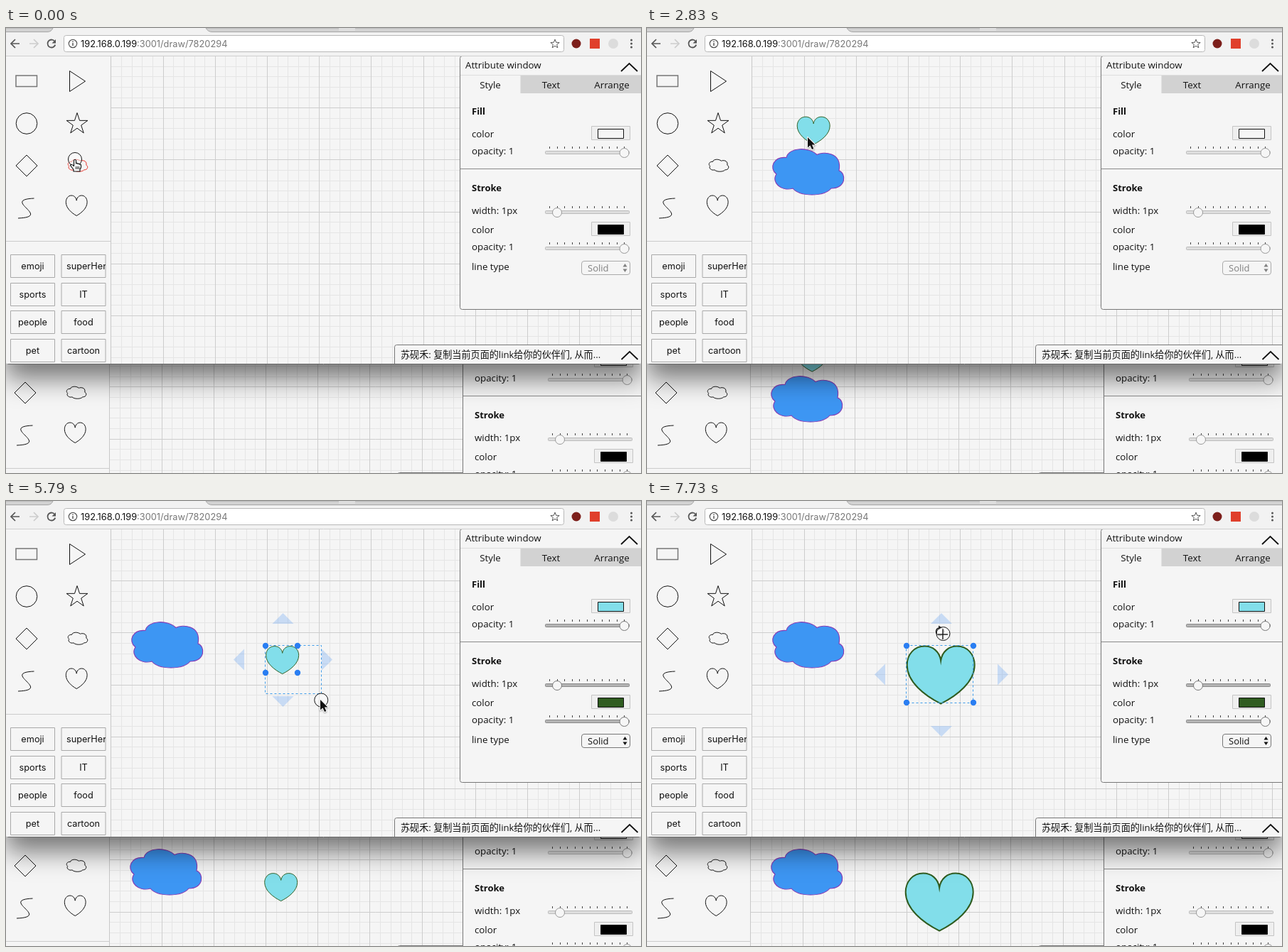
Recreate the animation shown at these times as an HTML page with a canvas. Size 893 by 627 pixels, loop 8 s.

```html
<!DOCTYPE html>
<html lang="en">
<head>
<meta charset="utf-8">
<title>Shared drawing board</title>
<style>
html, body { margin: 0; height: 100%; overflow: hidden; background: #f5f5f5; }
canvas { display: block; }
</style>
</head>
<body>
<canvas id="stage" width="893" height="627"></canvas>
<script>
const c = document.getElementById('stage').getContext('2d');
const LOOP = 8000, BG = '#f5f5f5';
const UI = 'Inter, sans-serif';
const PANEL = '"Open Sans", "Noto Sans CJK SC", "Noto Sans CJK", sans-serif';

const CLOUD = new Path2D('M5 35C-6 26 1 10 19 11.5C22 -3 51 -4 62 7.5C70 3 98 3 93 30' +
  'C103 33 104 55 82 55C72 67 38 67 28 55C12 60 -3 46 5 35Z');
const HEART = new Path2D('M50 25C48 9 38 0 26 0C11 0 0 14 0 33C0 62 26 86 50 100' +
  'C74 86 100 62 100 33C100 14 89 0 74 0C62 0 52 9 50 25Z');
const ARROW = new Path2D('M0 0V14.5L3.4 11.4L6 17L8.4 16L6 10.5H10.5Z');
const HAND = new Path2D('M-1.5 1.5Q0 -1 1.5 1.5V6Q3 4.5 4 6.5Q5.5 5.5 6.5 7.2Q8.5 6.5 8.5 9' +
  'V11Q8 13 7 14V17H-2V14.5L-6.5 8.5Q-5 6 -1.5 9.5Z');
const RESIZE = new Path2D('M-4 -4H2L0 -2L4 2L5 1V5H1L2 4L-2 0L-4 2Z');

// Cursor legs: start, frames, frame length, target, ease power, cursor on the way, cursor at the end
const LEGS = [
  [0, 1, 150, [97, 185], 1, 'hand', 'hand'],
  [1030, 3, 150, [98, 236], 1, 'arrow', 'arrow'],
  [1780, 1, 150, [98, 248], 1, 'hand', 'hand'],
  [2380, 6, 150, [237, 146], 2.3, 'arrow', 'arrow'],
  [3710, 5, 150, [392, 223], 1.4, 'arrow', 'arrow'],
  [4600, 3, 150, [407, 241], 1, 'arrow', 'resize'],
  [5640, 3, 150, [451, 291], 1.42, 'arrow', 'arrow'],
  [6090, 1, 150, [451, 290], 1, 'resize', 'resize'],
  [6390, 8, 148.5, [415, 187], 2, 'arrow', 'cross'],
];
const PRESSES = [[0, 140], [440, 590], [2230, 2380], [3420, 4310], [5350, 6090], [7730, LOOP]];

function pointer(t) {
  let from = LEGS[0][3], pose;
  for (const [start, n, step, to, power, way, end] of LEGS) {
    if (t < start) break;
    const k = Math.min(n, Math.floor((t - start) / step) + 1);
    const f = 1 - (1 - k / n) ** power;
    pose = { x: from[0] + (to[0] - from[0]) * f, y: from[1] + (to[1] - from[1]) * f,
             kind: k < n ? way : end, k };
    from = to;
  }
  pose.pressed = PRESSES.some(([a, b]) => t >= a && t < b);
  return pose;
}

function heartBox(t) {
  if (t < 4310) return [210.5, 124.5, 45, 38];
  return t < 6090 ? [365, 204, 45, 38] : [365, 204, 94, 80];
}

function ghostBox(t, p) {
  if (!p.pressed || t < 3420) return null;
  const [x, y, w, h] = heartBox(t);
  if (t < 4310) return [x + p.x - 237, y + p.y - 146, w, h];
  if (t < 5640 || t > 7000) return [x, y, w, h];
  const f = (p.k / 3) ** 0.92;
  return [x, y, w + 49 * f, h + 42 * f];
}

function rect(x, y, w, h, fill, stroke, r = 0, lw = 1) {
  c.beginPath();
  c.roundRect(x, y, w, h, r);
  paint(fill, stroke, lw);
}
function disc(x, y, r, fill, stroke, lw = 1) {
  c.beginPath();
  c.arc(x, y, r, 0, 7);
  paint(fill, stroke, lw);
}
function poly(points, fill, stroke, lw = 1, closed = true) {
  c.beginPath();
  points.forEach(([x, y]) => c.lineTo(x, y));
  if (closed) c.closePath();
  paint(fill, stroke, lw);
}
function paint(fill, stroke, lw) {
  if (fill) { c.fillStyle = fill; c.fill(); }
  if (stroke) { c.strokeStyle = stroke; c.lineWidth = lw; c.stroke(); }
}
const line = (x1, y1, x2, y2, color, lw = 1) => poly([[x1, y1], [x2, y2]], null, color, lw, false);

function text(s, x, y, font, color = '#111', align = 'left') {
  c.font = font;
  c.fillStyle = color;
  c.textAlign = align;
  c.fillText(s, x, y);
}
function shape(path, x, y, sx, sy, fill, stroke, lw) {
  const p = new Path2D();
  p.addPath(path, new DOMMatrix([sx, 0, 0, sy, x, y]));
  if (fill) { c.fillStyle = fill; c.fill(p); }
  c.strokeStyle = stroke;
  c.lineWidth = lw;
  c.stroke(p);
}
function star(x, y, outer, inner, stroke) {
  poly([...Array(10).keys()].map(i => {
    const r = i % 2 ? inner : outer, a = i * Math.PI / 5;
    return [x + r * Math.sin(a), y - r * Math.cos(a)];
  }), null, stroke);
}
const chevron = (x, y) => poly([[x - 11.5, y + 11], [x, y], [x + 11.5, y + 11]], null, '#111', 1.8, false);

function grid() {
  const cell = 14.64;
  for (const major of [false, true]) {
    const color = major ? '#cdcdcd' : '#e5e5e5';
    for (let i = 1; i < 52; i++) {
      if ((i % 5 === 0) !== major) continue;
      const x = Math.floor(147.9 + i * cell) + .5, y = Math.floor(39.5 + i * cell) + .5;
      line(x, 39, x, 480, color);
      if (y < 480) line(147, y, 900, y, color);
    }
  }
}

function sidebar(hover) {
  rect(0, 39, 147, 441, BG);
  line(147.5, 39, 147.5, 480, '#c8c8c8');
  line(0, 300.5, 147, 300.5, '#ccc');
  rect(14, 67, 29.5, 15.5, null, '#777', 0, 1.5);
  poly([[89.5, 60.5], [111.5, 75], [89.5, 89.5]], null, '#111');
  disc(29, 134.5, 14.8, null, '#111');
  star(100, 135.2, 15.7, 6, '#111');
  poly([[29, 179], [44, 194], [29, 209], [14, 194]], null, '#111');
  shape(CLOUD, 87.3, 185.3, .275, .265, null, hover === 'cloud' ? '#e8342c' : '#111', 1);
  c.beginPath();
  c.moveTo(39.5, 240);
  c.bezierCurveTo(-8, 242, 66, 266, 17, 268);
  paint(null, '#111', 1);
  shape(HEART, 84.3, 236, .298, .285, null, hover === 'heart' ? '#e8342c' : '#111', 1);
  const rows = [['emoji', 'superHero'], ['sports', 'IT'], ['people', 'food'], ['pet', 'cartoon']];
  rows.forEach((row, i) => row.forEach((label, j) => {
    const x = 6.5 + 71.5 * j, y = Math.floor(319.5 + 39.6 * i) + .5;
    c.save();
    rect(x, y, 62, 32, null, '#a9a9a9');
    c.clip();
    const wide = label.length > 8;
    text(label, wide ? 85 : x + 31, y + 20.5, '12.7px ' + UI, '#111', wide ? 'left' : 'center');
    c.restore();
  }));
}

function slider(y, knob, on) {
  for (let i = 0; i < 11; i++) line(764.5 + Math.round(i * 10.5), y - 8, 764.5 + Math.round(i * 10.5), y - 5, '#444');
  rect(758.5, y - 1.5, 118, 4, on ? '#b4b4b4' : '#dedede', on ? '#8b8b8b' : '#bbb', 1);
  disc(knob, y + 1, 6.5, '#f6f6f6', on ? '#777' : '#999');
}
function swatch(y, color) {
  rect(823.5, y + .5, 54, 19, '#efefef', '#c4c4c4');
  rect(832.5, y + 4.5, 36, 13, color, '#111');
}

function panel(on) {
  const font = '13.3px ' + PANEL, bold = 'bold 13px ' + PANEL;
  rect(638.5, 39.5, 262, 357, BG, '#777', 3);
  text('Attribute window', 646, 56.5, font);
  chevron(876.5, 50);
  line(639, 66.5, 893, 66.5, '#ddd');
  rect(723.5, 67, 176, 25, '#d2d2d2');
  ['Style', 'Text', 'Arrange'].forEach((s, i) => text(s, 681 + 85.5 * i, 85, font, '#111', 'center'));
  text('Fill', 655, 122, bold);
  text('color', 655, 154, font);
  swatch(138, on ? '#82deea' : BG);
  text('opacity: 1', 655, 178, font);
  slider(175, 869.5, on);
  line(639, 198.5, 900, 198.5, '#8a8a8a');
  text('Stroke', 655, 230, bold);
  text('width: 1px', 655, 262, font);
  slider(259, 775, on);
  text('color', 655, 289, font);
  swatch(273, on ? '#2f5c20' : '#000');
  text('opacity: 1', 655, 313, font);
  slider(310, 869.5, on);
  text('line type', 655, 340.5, font);
  const ink = on ? '#111' : '#808080';
  rect(809.5, 328.5, 68, 19, BG, on ? '#777' : '#aaa', 3.5);
  text('Solid', 818, 342.5, '13px ' + PANEL, ink);
  poly([[867.5, 336.5], [870.5, 332], [873.5, 336.5]], ink);
  poly([[867.5, 339.5], [870.5, 344], [873.5, 339.5]], ink);
}

function chat() {
  rect(546.5, 446.5, 360, 30, BG, '#777', 3);
  text('苏砚禾: 复制当前页面的link给你的伙伴们, 从而...', 555, 464.5, '13.1px ' + PANEL);
  chevron(877, 456);
}

function drawing(t, delay) {
  if (t >= 440 + delay) shape(CLOUD, 177, 171, 1, 1, '#3d96f3', '#8639b4', 1.1);
  if (t >= 2380 + delay) {
    const [x, y, w, h] = heartBox(t);
    shape(HEART, x + .7, y + .6, (w + 1) / 100, (h + 1) / 100, '#82deea', '#2f5c20', w / 47);
  }
}

function selection(t, ghost) {
  const [x, y, w, h] = heartBox(t), mx = x + w / 2 + 2, my = y + h / 2 + .5;
  const r = x + w + 34, b = y + h + 33, l = x - 30, u = y - 31;
  for (const tri of [
    [[mx, u - 15], [mx - 15, u], [mx + 15, u]], [[mx, b + 15], [mx - 15, b], [mx + 15, b]],
    [[l - 15, my], [l, my - 15], [l, my + 15]], [[r + 15, my], [r, my - 15], [r, my + 15]],
  ]) poly(tri, 'rgba(42,127,240,.22)');
  if (!ghost || t >= 7730) {
    const cx = x + w / 2, cy = y - 20;
    disc(cx, cy, 8, 'rgba(255,255,255,.7)');
    c.beginPath();
    c.arc(cx, cy, 5.5, -.9, 4.3);
    paint(null, '#222', 1.7);
    poly([[cx - 2, cy - 8.5], [cx + 3, cy - 5.5], [cx - 2, cy - 2.5]], '#222');
  }
  if (ghost) {
    const [gx, gy, gw, gh] = ghost.map(Math.round);
    c.setLineDash([3, 3]);
    rect(gx - .5, gy - .5, gw, gh + 1, null, '#3e9cea');
    c.setLineDash([]);
  }
  for (const hx of [x, x + w]) for (const hy of [y, y + h]) disc(hx, hy, 4.2, '#2a7ef2');
}

function page(t, front) {
  const on = front && t >= 3420;
  const shift = front ? 0 : 320;
  const at = (dx, draw) => { c.save(); c.translate(dx, shift); draw(); c.restore(); };
  const hover = !front ? '' : t < 1030 ? 'cloud' : t >= 1780 && t < 2380 ? 'heart' : '';
  at(front ? 0 : -2, () => { grid(); sidebar(hover); drawing(t, front ? 0 : 150 * (t < 4310)); });
  if (on) selection(t, ghostBox(t, pointer(t)));
  c.save();
  if (!front) c.translate(4, 180);
  chat();
  c.restore();
  at(front ? 0 : 4, () => panel(on));
}

function browserBar() {
  rect(0, 0, 893, 39, '#f2f2f2');
  c.beginPath();
  c.moveTo(0, 0); c.lineTo(66, 0); c.quadraticCurveTo(64, 5.5, 58, 5.5); c.lineTo(0, 5.5);
  paint('#d2d2d2', '#a6a6a6', 1);
  c.beginPath();
  c.moveTo(900, 0); c.lineTo(281, 0); c.quadraticCurveTo(284, 5.5, 290, 5.5); c.lineTo(900, 5.5);
  paint('#d2d2d2', '#a6a6a6', 1);
  rect(468, 0, 23, 4, '#dedede');
  const nav = (x, dir, color) => {
    line(x - 6, 22, x + 6, 22, color, 1.7);
    poly([[x, 16], [x + 6 * dir, 22], [x, 28]], null, color, 1.7, false);
  };
  nav(13, -1, '#555');
  nav(39, 1, '#ccc');
  c.beginPath();
  c.arc(64, 22, 5.5, .3, 5.5);
  paint(null, '#555', 1.8);
  poly([[70, 16], [70, 21.5], [64.5, 21.5]], '#555');
  rect(81.5, 10.5, 703, 23, '#fff', '#b8b8b8', 3);
  disc(94, 22, 5.7, null, '#555', 1.2);
  line(94, 21, 94, 25, '#555', 1.5);
  line(94, 18.5, 94, 20, '#555', 1.5);
  const font = '12.8px ' + UI;
  text('192.168.0.199', 105, 26.5, font);
  text(':3001/draw/7820294', 105 + c.measureText('192.168.0.199').width, 26.5, font, '#777');
  star(772, 22.5, 6.5, 2.8, '#555');
  disc(802, 22, 6.5, '#7c1f1b');
  rect(821, 15, 14, 14, '#e0402c');
  disc(854, 22, 7, '#dcdcdc');
  for (const y of [17, 22, 27]) disc(879.5, y, 1.5, '#555');
  line(0, 39.5, 893, 39.5, '#cfcfcf');
}

function cursor({ x, y, kind, pressed }) {
  if (pressed) disc(x + (kind === 'hand' ? 0 : 1.5), y, 9.5, 'rgba(255,255,255,.45)', '#111');
  c.save();
  c.translate(Math.round(x), Math.round(y));
  c.lineJoin = 'round';
  if (kind === 'cross') {
    line(-6, 1, 8, 1, '#fff', 3);
    line(1, -6, 1, 8, '#fff', 3);
    line(-6, 1, 8, 1, '#111', 1.4);
    line(1, -6, 1, 8, '#111', 1.4);
  } else if (kind === 'hand') {
    shape(HAND, 0, 0, 1, 1, '#fff', '#111', 1.2);
    for (const dx of [1.5, 3.5, 5.5]) line(dx, 10, dx, 14, '#111', .9);
  } else {
    const path = kind === 'arrow' ? ARROW : RESIZE;
    c.shadowColor = 'rgba(0,0,0,.35)';
    c.shadowBlur = 2;
    c.shadowOffsetY = 1;
    shape(path, 0, 0, 1, 1, null, '#fff', 2);
    c.shadowColor = 'transparent';
    c.fillStyle = '#111';
    c.fill(path);
  }
  c.restore();
}

function draw(t) {
  rect(0, 0, 893, 627, BG);
  page(t, false);
  c.save();
  c.shadowColor = 'rgba(0,0,0,.52)';
  c.shadowBlur = 36;
  c.shadowOffsetY = 20;
  rect(0, -60, 893, 534, BG, null, 4);
  c.restore();
  c.save();
  c.beginPath();
  c.roundRect(0, -60, 893, 534, 4);
  c.clip();
  page(t, true);
  browserBar();
  line(0, 473.5, 893, 473.5, '#6a6a6a');
  c.restore();
  cursor(pointer(t));
}

const start = performance.now();
(function tick() {
  draw((performance.now() - start) % LOOP);
  requestAnimationFrame(tick);
})();
</script>
</body>
</html>
```
